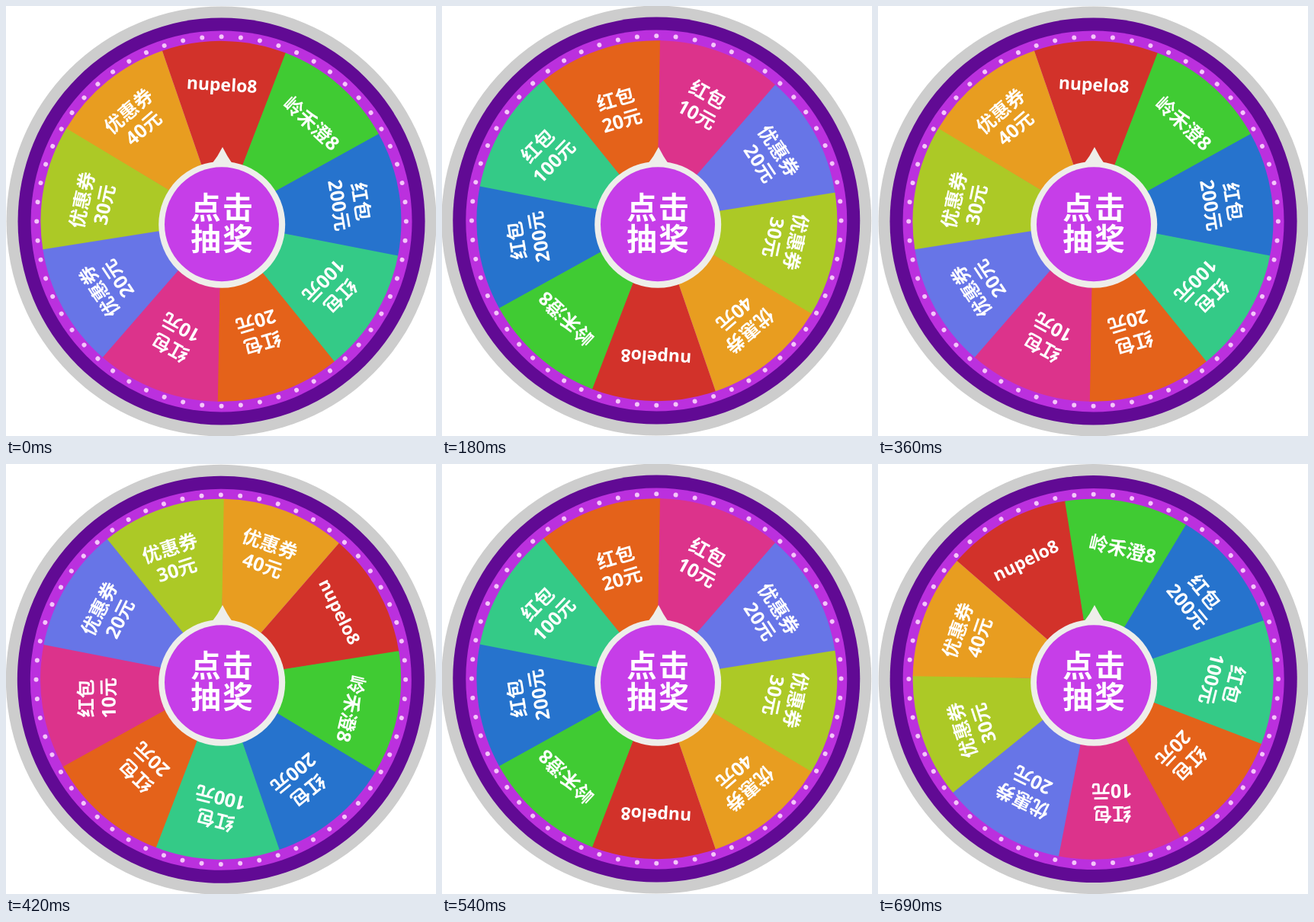
Write an HTML page that moves like this. It is 564x564 px and loops after 0.72 s.

```html
<!DOCTYPE html>
<html lang="zh-CN">
<head>
<meta charset="utf-8">
<title>抽奖转盘</title>
<style>
  html, body { margin: 0; width: 100%; height: 100%; overflow: hidden; background: #fff; }
  svg { display: block; width: 100vw; height: 100vh; }
  text {
    font-family: "Open Sans", "Noto Sans CJK SC", "Noto Sans CJK", sans-serif;
    font-weight: 700;
    fill: #fff;
    text-anchor: middle;
  }
</style>
</head>
<body>
<svg viewBox="0 0 564 564">
  <g id="wheel">
    <circle r="282" fill="#cdcdcd"/>
    <circle r="267" fill="#610a94"/>
    <circle r="250" fill="#bb30de"/>
    <g id="dots" fill="#f4c6fa"></g>
    <g id="slices" transform="translate(-.6 -.1)"></g>
  </g>
  <path d="M284 185 Q290 197 297 207 L270 207 Q278 197 284 185Z" fill="#eeeeea"/>
  <circle cx="283.2" cy="286.8" r="83" fill="#eeeeea"/>
  <circle cx="283" cy="286.3" r="75" fill="#c63ee8"/>
  <g font-size="39.5" letter-spacing="2.5">
    <text x="284.3" y="279.3">点击</text>
    <text x="284.3" y="320.3">抽奖</text>
  </g>
</svg>
<script>
const NS = 'http://www.w3.org/2000/svg';
const RADIUS = 236.5, SLICE = 40, LINE = 29.5;
const STEP_MS = 30, STEP_DEG = 30, LOOP_MS = 720, START_DEG = 1;

// Each slice: colour, lines, label centre (x, y) and tilt within the slice
const prizes = [
  ['#d2322a', ['nupelo8'], -2, -177, 2.5],
  ['#40cb33', ['岭禾澄8'], 5.5, -175, 2.2],
  ['#2673cd', ['红包', '200元'], 3.3, -171, -0.5],
  ['#34ca87', ['红包', '100元'], 0.5, -170.5, 13],
  ['#e4621a', ['红包', '20元'], 0, -154, 2.5],
  ['#dc338b', ['红包', '10元'], 0.8, -164, 8],
  ['#6775e7', ['优惠券', '20元'], -1.5, -169.5, -4.5],
  ['#acc926', ['优惠券', '30元'], -7.5, -169.5, 1],
  ['#e89d20', ['优惠券', '40元'], -2.8, -174, -2]
];

function add(parent, tag, attrs, text) {
  const el = document.createElementNS(NS, tag);
  for (const k in attrs) el.setAttribute(k, attrs[k]);
  if (text) el.textContent = text;
  return parent.appendChild(el);
}

function rim(deg) {
  const a = deg * Math.PI / 180;
  return `${RADIUS * Math.sin(a)} ${-RADIUS * Math.cos(a)}`;
}

const wheel = document.getElementById('wheel');
const dots = document.getElementById('dots');
const slices = document.getElementById('slices');

for (let a = 0; a < 360; a += 6) {
  add(dots, 'circle', { cy: -242.3, r: 3, transform: `rotate(${a})` });
}

prizes.forEach(([fill, lines, x, y, tilt], i) => {
  const g = add(slices, 'g', { transform: `rotate(${START_DEG + i * SLICE})` });
  // A slight overlap hides seams between neighbours
  const end = i < prizes.length - 1 ? SLICE / 2 + 0.2 : SLICE / 2;
  add(g, 'path', { fill, d: `M0 0L${rim(-SLICE / 2)}A${RADIUS} ${RADIUS} 0 0 1 ${rim(end)}Z` });
  const label = add(g, 'g', { transform: `translate(${x} ${y}) rotate(${tilt})` });
  const latin = /^[a-z]/.test(lines[0]);
  lines.forEach((line, n) => {
    const offset = (n - (lines.length - 1) / 2) * LINE;
    add(label, 'text', { y: offset + (latin ? 6 : 9.3), 'font-size': latin ? 23 : 25 }, line);
  });
});

function draw(ms) {
  const turn = Math.floor((ms % LOOP_MS) / STEP_MS) * STEP_DEG;
  // The rings sit slightly off the pivot, so the wheel wobbles
  wheel.setAttribute('transform', `translate(281.9 282) rotate(${turn}) translate(.65 .45)`);
}

const start = performance.now();
function tick() {
  draw(performance.now() - start);
  requestAnimationFrame(tick);
}
draw(0);
requestAnimationFrame(tick);
</script>
</body>
</html>
```
